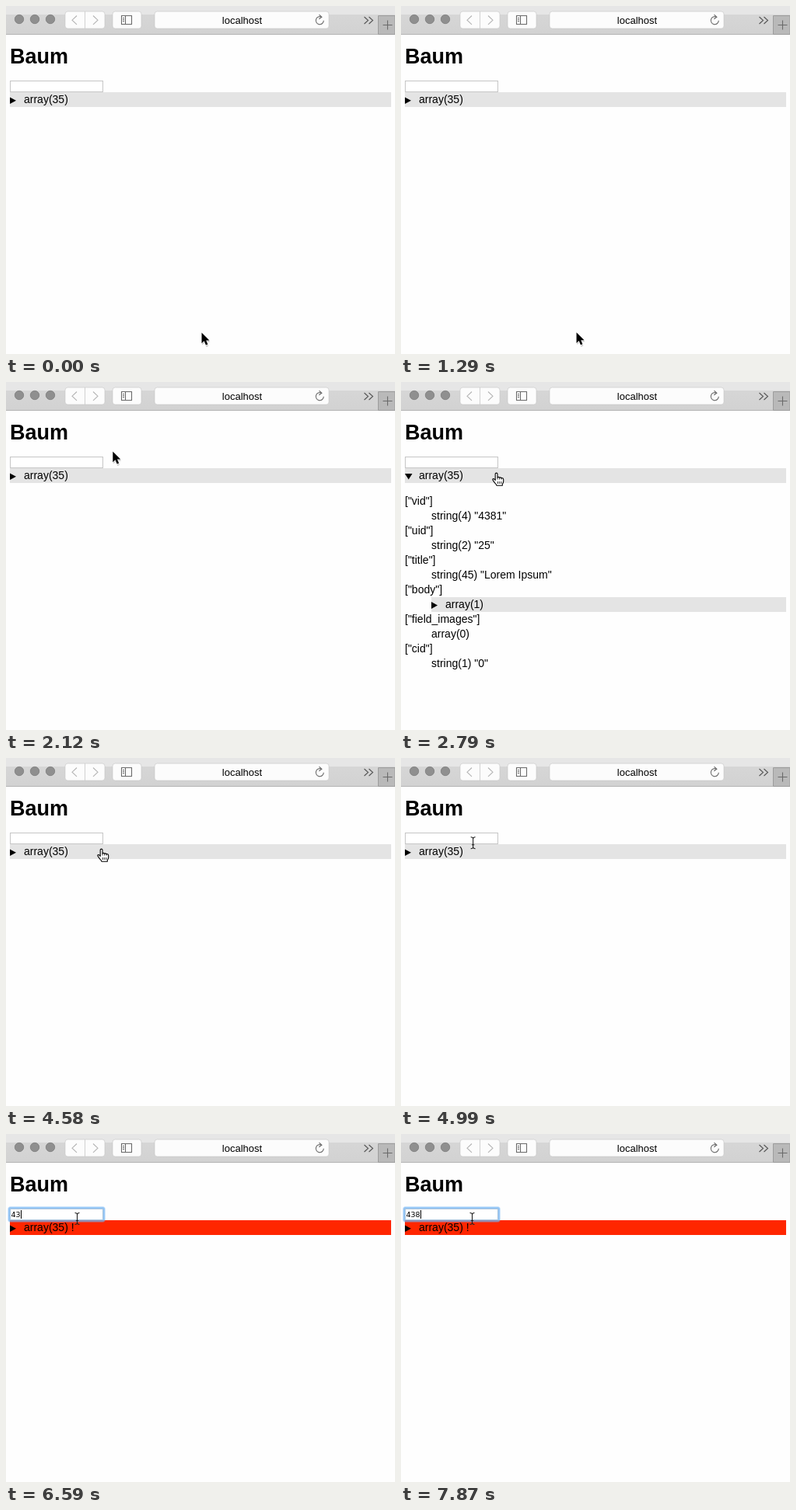
Animation, 500 px wide and 448 px high, one loop 8 s. Source, as an HTML page:

```html
<!DOCTYPE html>
<html lang="en">
<head>
<meta charset="utf-8">
<title>Baum</title>
<style>
html, body { margin: 0; width: 100%; height: 100%; overflow: hidden; background: #fefefe; }
svg { display: block; }
text { font: 14px "Liberation Sans", Arial, sans-serif; white-space: pre; }
h1, .title { font-size: 27px; font-weight: bold; }
.url { font-size: 13px; text-anchor: middle; }
.typed { font: 9.5px "DejaVu Sans", sans-serif; }
.button { fill: #fcfcfc; stroke: #c4c4c4; stroke-width: .6; }
.icon { fill: none; stroke: #6a6a6a; stroke-width: 1.1; }
</style>
</head>
<body>
<svg width="500" height="448" viewBox="0 0 500 448">
  <defs>
    <linearGradient id="bar" x1="0" y1="0" x2="0" y2="1">
      <stop offset="0" stop-color="#d6d6d6"/><stop offset="1" stop-color="#d2d2d2"/>
    </linearGradient>
  </defs>

  <g id="toolbar">
    <rect width="500" height="11" fill="#e6e6e6"/>
    <rect y="11" width="500" height="25" fill="url(#bar)"/>
    <rect y="36" width="500" height="1" fill="#b4b4b4"/>
    <g fill="#8f8f8f" stroke="#7c7c7c" stroke-width=".8">
      <circle cx="17" cy="17" r="5.7"/><circle cx="37" cy="17" r="5.7"/><circle cx="57" cy="17" r="5.7"/>
    </g>
    <rect class="button" x="76" y="7" width="51" height="22" rx="3.5"/>
    <path d="M101.5 7v22" stroke="#d0d0d0"/>
    <rect class="button" x="137" y="7" width="37" height="22" rx="3.5"/>
    <rect class="button" x="191" y="7" width="224" height="22" rx="3.5"/>
    <path class="icon" style="stroke:#b4b4b4" d="M91 12.5l-6 5.7 6 5.7M112 12.5l6 5.7 -6 5.7"/>
    <path class="icon" d="M148.5 12.5h13v11h-13zM153.5 12.5v11M150 15.5h2M150 17.5h2M150 19.5h2"/>
    <path class="icon" d="M405.5 14.2a5 5 0 1 0 2.8 4.6M402.5 11.2l3.4 3 -3.6 2.6"/>
    <path class="icon" style="stroke:#555" d="M460.5 14l5 4.5 -5 4.5M466.5 14l5 4.5 -5 4.5"/>
    <path d="M478.5 36.5v-24H500v24z" fill="#b9b9b9" stroke="#9c9c9c"/>
    <path class="icon" d="M484.500 24.500h12M490.500 18.500v12"/>
    <text class="url" x="303.500" y="23">localhost</text>
  </g>

  <text class="title" x="5" y="74">Baum</text>
  <rect id="root" x="5" y="111" width="490" height="19"/>
  <path id="closed" d="M5 117.500v8.500l8-4.250z"/>
  <path id="opened" d="M5 118h9.500l-4.750 7.500z"/>
  <text id="label" x="23" y="125"></text>
  <g id="tree"></g>

  <g id="ring" fill="none" stroke="#6fb2f2">
    <rect x="3" y="94" width="124" height="19" rx="3" stroke-width="1.500" opacity=".4"/>
    <rect x="4.250" y="95.250" width="121.500" height="16.500" rx="1.500" stroke-width="2" opacity=".75"/>
  </g>
  <rect id="field" x="5.500" y="96.500" width="119" height="14" fill="#fff"/>
  <text id="typed" class="typed" x="6.500" y="107"></text>
  <rect id="caret" y="98" width="1" height="11"/>

  <g id="arrow">
    <path d="M.5 1v14l3.200-2.800 2.300 5.500 2.800-1.200-2.300-5.200h4.500z" fill="#000" opacity=".2" transform="translate(.5 1.200)"/>
    <path d="M.5 .5v13.700l3.200-2.900 2.200 5.300 2.500-1-2.200-5.200h4.300z" stroke="#fff" stroke-width="1.200" paint-order="stroke"/>
  </g>
  <g id="hand" transform="translate(0 0)">
    <path d="M-1.500 9.500L-3 4.500M-1.300 10V2a1.400 1.400 0 0 1 2.800 0v4.500q1.300-1.400 2.600.2 1.400-1 2.500.5 2.400-.6 2.600 1.800v2.500q0 1.800-1.400 3.500v1.800H.5q-.8-2-2.200-3.200l-2.400-3.200q-1.200-2 .2-2.400 1.300-.1 2.600 2" fill="none" stroke="none"/>
    <path d="M-1.300 10V2a1.400 1.400 0 0 1 2.800 0v4.500q1.300-1.400 2.600.2 1.400-1 2.500.5 2.400-.6 2.600 1.800v2.500q0 1.800-1.400 3.500v1.800H.5q-.8-2-2.200-3.200l-2.400-3.200q-1.200-2 .2-2.400 1.300-.1 2.600 2z" fill="#fff" stroke="#000" stroke-width="1.100" stroke-linejoin="round"/>
    <path d="M1.500 6.500v2.500M4.100 6.700v2.300M6.600 7.200v2M2 11.500v3M4.200 11.500v3M6.400 11.500v3" stroke="#000" stroke-width=".8"/>
  </g>
  <path id="beam" d="M-3-6.500q3 0 3 2.200 0-2.200 3-2.200M0-4.500V6.500M-1.700 3.500h3.400M-3 8.500q3 0 3-2.200 0 2.200 3 2.200" fill="none" stroke="#222" stroke-width="1.100"/>
</svg>

<script>
const LOOP = 8000;
const $ = id => document.getElementById(id);
const show = (id, on) => $(id).setAttribute("visibility", on ? "visible" : "hidden");
const within = (v, a, b) => v >= a && v < b;

const entries = [
  ["vid", 'string(4) "4381"'],
  ["uid", 'string(2) "25"'],
  ["title", 'string(45) "Lorem Ipsum"'],
  ["body", "array(1)", true],
  ["field_images", "array(0)"],
  ["cid", 'string(1) "0"']
];
$("tree").innerHTML = entries.map(([key, value, nested], i) => {
  const y = 158 + i * 38;
  const fold = nested
    ? `<rect x="39" y="${y + 5}" width="456" height="19" fill="#e4e4e4"/>
       <path d="M39 ${y + 11}v9l8-4.500z"/>` : "";
  return `<text x="5" y="${y}">["${key}"]</text>${fold}
    <text x="${nested ? 57 : 39}" y="${y + 19}">${value}</text>`;
}).join("");

// Pointer stops: time, x, y of the hot spot, easing into the stop
const linear = p => p;
const easeOut = p => p * (2 - p);
const smooth = p => p * p * (3 - 2 * p);
const stops = [
  [0, 251, 420], [30, 251, 420], [1290, 226, 422],
  [1550, 100.5, 131, easeOut], [1660, 93, 122, easeOut], [1810, 93, 122],
  [2120, 136.5, 89, smooth], [2200, 148, 89, easeOut], [2350, 148, 89],
  [2490, 122.5, 116.5, smooth], [4610, 122.5, 116.5],
  [5040, 91.5, 108, smooth], [LOOP, 91.5, 108]
];

function pointer(t) {
  const i = stops.findIndex(s => s[0] > t);
  const [t0, x0, y0] = stops[i - 1];
  const [t1, x1, y1, ease = linear] = stops[i];
  const p = ease((t - t0) / (t1 - t0));
  return [x0 + (x1 - x0) * p, y0 + (y1 - y0) * p];
}

function drawPointer(t) {
  const [x, y] = pointer(t);
  const kind = within(y, 111, 130) ? "hand"
    : within(y, 96, 111) && within(x, 5, 125) ? "beam" : "arrow";
  for (const id of ["arrow", "hand", "beam"])
    show(id, id === kind && !within(t, 30, 1290));
  $(kind).setAttribute("transform", `translate(${x} ${y})`);
}

function draw(t) {
  const open = within(t, 2790, 4580);
  const found = t >= 6230;
  const focus = t >= 5070;
  const count = [6110, 6590, 7870].filter(at => t >= at).length;

  show("tree", open);
  show("opened", open);
  show("closed", !open);
  $("root").setAttribute("fill", found ? "#ff2600" : "#e4e4e4");
  $("label").textContent = found ? "array(35) !" : "array(35)";

  show("ring", focus);
  $("field").setAttribute("stroke", focus ? "#a9c4dd" : "#c6c6c6");
  $("typed").textContent = "438".slice(0, count);
  $("caret").setAttribute("x", 7 + 6 * count);
  show("caret", focus && !within(t, 5580, 6060) && !within(t, 7100, 7600));
  drawPointer(t);
}

const start = performance.now();
function tick() {
  draw((performance.now() - start) % LOOP);
  requestAnimationFrame(tick);
}
tick();
</script>
</body>
</html>
```
